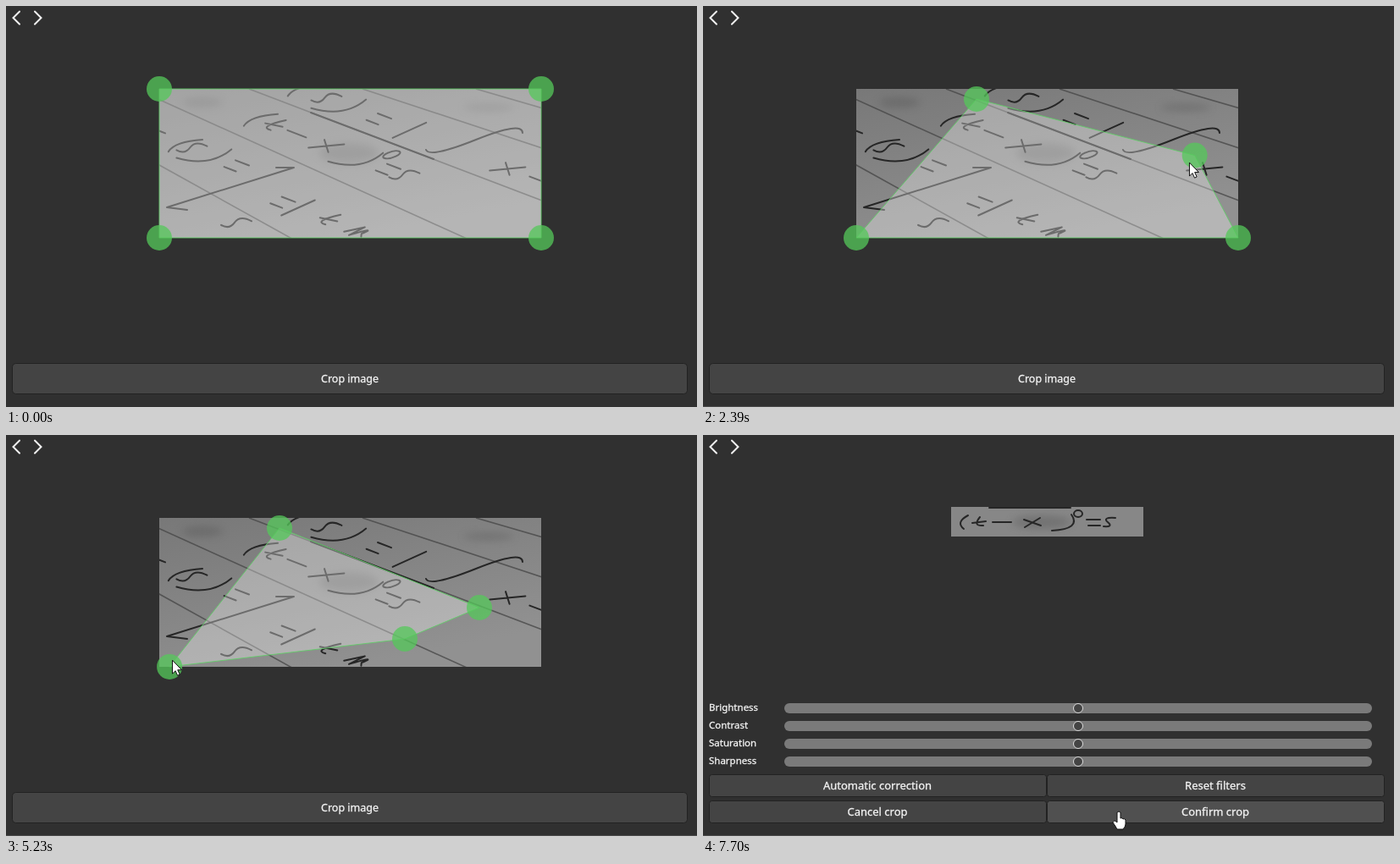
Recreate the animation shown at these times as an HTML page. Size 816 px wide and 474 px high, loop 8.31 s.

```html
<!DOCTYPE html>
<html lang="en">
<head>
<meta charset="utf-8">
<title>Crop image</title>
<style>
  html, body { margin: 0; height: 100%; overflow: hidden; background: #303030; }
  svg { display: block; width: 816px; height: 474px; }
  text { fill: #f4f4f4; stroke: #f4f4f4; stroke-width: .3; font: 13px "Noto Sans", sans-serif; text-anchor: middle; }
  .label { font-size: 11.5px; text-anchor: start; }
  .button { fill: #444; stroke: #222; }
  .hover { fill: #505050; }
  .ink { fill: none; stroke: #262626; stroke-width: 2; stroke-linecap: round; stroke-linejoin: round; }
  .ink path { vector-effect: non-scaling-stroke; }
  .pointer { fill: #fff; stroke: #111; }
</style>
</head>
<body>
<svg viewBox="0 0 816 474">
  <defs>
    <linearGradient id="shade" x2=".5" y2="1">
      <stop offset="0" stop-color="#787878"/>
      <stop offset="1" stop-color="#919191"/>
    </linearGradient>
    <filter id="soft" x="-50%" y="-50%" width="200%" height="200%"><feGaussianBlur stdDeviation="5"/></filter>
    <clipPath id="frame"><path d="M181 98H632V274H181Z"/></clipPath>
    <g id="formula" class="ink"></g>
  </defs>

  <path d="M16 6.5L8.5 14L16 21.5M34 6.5L41.5 14L34 21.5" fill="none" stroke="#f4f4f4" stroke-width="2" stroke-linecap="round"/>
  <path id="bottomLine" d="M0 473.5H816" stroke="#4a4a4a"/>

  <g id="cropView">
    <g clip-path="url(#frame)">
      <path d="M181 98H632V274H181Z" fill="url(#shade)"/>
      <g fill="#555" opacity=".4" filter="url(#soft)">
        <ellipse cx="232" cy="114" rx="24" ry="6"/>
        <ellipse cx="405" cy="174" rx="35" ry="12"/>
        <ellipse cx="570" cy="120" rx="30" ry="4"/>
      </g>
      <path id="rules" fill="none" stroke="#444" stroke-opacity=".75" stroke-width="1.6"/>
      <!-- Sheet lying at an angle -->
      <g transform="matrix(1 .385 -2.2 1 323 110)">
        <use href="#formula"/>
        <g id="otherRows" class="ink"></g>
      </g>
      <path class="ink" d="M360 126L505 181M496 170Q500 180 555 158T610 150M214 241L190 238L340 191L319 191"/>
    </g>
    <path id="selection" fill="#fff" fill-opacity=".32" stroke="#5fcf66" stroke-opacity=".85"/>
    <g id="handles" fill="#54c85a" fill-opacity=".75"></g>
    <rect class="button" x="7.5" y="422.5" width="797" height="36" rx="4"/>
    <text x="406" y="445" style="font-size:12.5px">Crop image</text>
  </g>

  <g id="filterView">
    <path d="M293 85H520V120H293Z" fill="#878787"/>
    <ellipse cx="400" cy="103" rx="35" ry="8" fill="#555" opacity=".4" filter="url(#soft)"/>
    <path class="ink" d="M338 86H434"/>
    <use href="#formula" x="293" y="85"/>
    <g id="sliders"></g>
    <g id="buttons"></g>
  </g>

  <path id="arrow" class="pointer" d="M.5.5V16.5L4 13L6.6 18.6L9.2 17.4L6.7 12H11.5Z"/>
  <path id="hand" class="pointer" d="M-2 1Q0-1 2 1V8Q4 7 5 9Q7 8 8 10V15Q8 18 5 21H-2Q-4 17-7 13Q-6 9-2 13Z"/>
</svg>
<script>
const LOOP = 8310, LAG = 40, FILTERS_AT = 7550, HOVER_AT = 7620, HAND_AT = 6785;
const $ = id => document.getElementById(id);
const show = (id, on) => $(id).style.display = on ? "" : "none";
const clamp = (v, low, high) => Math.min(Math.max(v, low), high);
const ease = p => p * p * (3 - 2 * p);

// Pen strokes of each sign, around its centre
const signs = {
  "(": "M5-8Q-10 0 0 8",
  ")": "M10-9Q22 8-13 10",
  "t": "M-8 1L8-1M1-6Q-8 5 5 4",
  "x": "M-10-3L10 4M9-5L-9 6",
  "s": "M8-5Q-8-6-1 0T-6 5",
  "n": "M-9 4L-2-4L-1 5Q6-8 5 1L9 3",
  "o": "M-5-10A5 4 0 1 1 5-10A5 4 0 1 1-5-10",
  "=": "M-8-3H8M-6 4H8",
  "-": "M-11 0H11",
  "/": "M0-9V9"
};
const write = (row, x, y) => [...row].map((sign, i) =>
  signs[sign] ? `<path d="${signs[sign]}" transform="translate(${x + 9 * i} ${y})"/>` : "").join("");

$("formula").innerHTML = write("( t  -   x   ) o = s", 15, 18);
$("otherRows").innerHTML =
  write("(  s )    =   /            x   -", 1, -12) +
  write("=   (s )   =", -33, 53) +
  write("= /   t   n", 147, 65) +
  write("s", 146, 90);

// Ruled lines flatten with distance
$("rules").setAttribute("d", [0, 1, 2, 3, 4].map(i => `M${19 + 134 * i} 98l${(1.8 + .41 * i) * 180} 180`).join(""));

// Pointer moves: start, end, destination
const entry = [196, 74];
const moves = [
  [20, 180, 181, 98], [180, 620, 320, 125], [620, 750, 320, 107], [1205, 1220, 323, 110],
  [1550, 1800, 640, 106], [1960, 2540, 561, 200], [3020, 3100, 559, 204],
  [3295, 3760, 632, 274], [3760, 4310, 471, 241],
  [4650, 4990, 192, 277], [5150, 5600, 239, 145], [5610, 5770, 244, 140], [5960, 6020, 253, 143],
  [6580, 6800, 491, 445]
];
const corners = [[181, 98], [632, 98], [632, 274], [181, 274]];
const drags = [[180, 1300], [1960, 3200], [3760, 4500], [5150, 6500]];

function pointerAt(t) {
  let [x, y] = entry;
  for (const [start, end, toX, toY] of moves) {
    const p = ease(clamp((t - start) / (end - start), 0, 1));
    x += (toX - x) * p;
    y += (toY - y) * p;
  }
  return [x, y];
}

function handleAt(i, t) {
  const [start, end] = drags[i];
  return t < start ? corners[i] : pointerAt(Math.min(t, end));
}

$("handles").innerHTML = corners.map(() => '<circle r="15"/>').join("");

$("sliders").innerHTML = ["Brightness", "Contrast", "Saturation", "Sharpness"].map((name, i) => {
  const y = 323 + 21 * i;
  return `<text class="label" x="7" y="${y + 3}">${name}</text>
    <rect x="96" y="${y - 6}" width="694" height="12" rx="6" fill="#7a7a7a"/>
    <circle cx="443" cy="${y}" r="5.5" fill="#444" stroke="#ddd"/>`;
}).join("");

$("buttons").innerHTML = ["Automatic correction", "Reset filters", "Cancel crop", "Confirm crop"].map((name, i) => {
  const x = 7.5 + 399 * (i % 2), y = 401.5 + 31 * (i >> 1);
  return `<rect class="button" x="${x}" y="${y}" width="398" height="26" rx="3"/>
    <text x="${x + 198.5}" y="${y + 17.5}">${name}</text>`;
}).join("");
const confirmButton = $("buttons").querySelector("rect:last-of-type");

function draw(t) {
  const points = corners.map((_, i) => handleAt(i, t - LAG));
  $("selection").setAttribute("d", "M" + points.join("L") + "Z");
  points.forEach((point, i) => $("handles").children[i].setAttribute("transform", `translate(${point})`));

  const place = `translate(${pointerAt(t)})`;
  $("arrow").setAttribute("transform", place);
  $("hand").setAttribute("transform", place);
  show("arrow", t >= 20 && t < HAND_AT);
  show("hand", t >= HAND_AT);
  show("bottomLine", t >= 20);
  show("cropView", t < FILTERS_AT);
  show("filterView", t >= FILTERS_AT);
  confirmButton.classList.toggle("hover", t >= HOVER_AT);
}

const begin = performance.now();
function tick() {
  draw((performance.now() - begin) % LOOP);
  requestAnimationFrame(tick);
}
tick();
</script>
</body>
</html>
```
